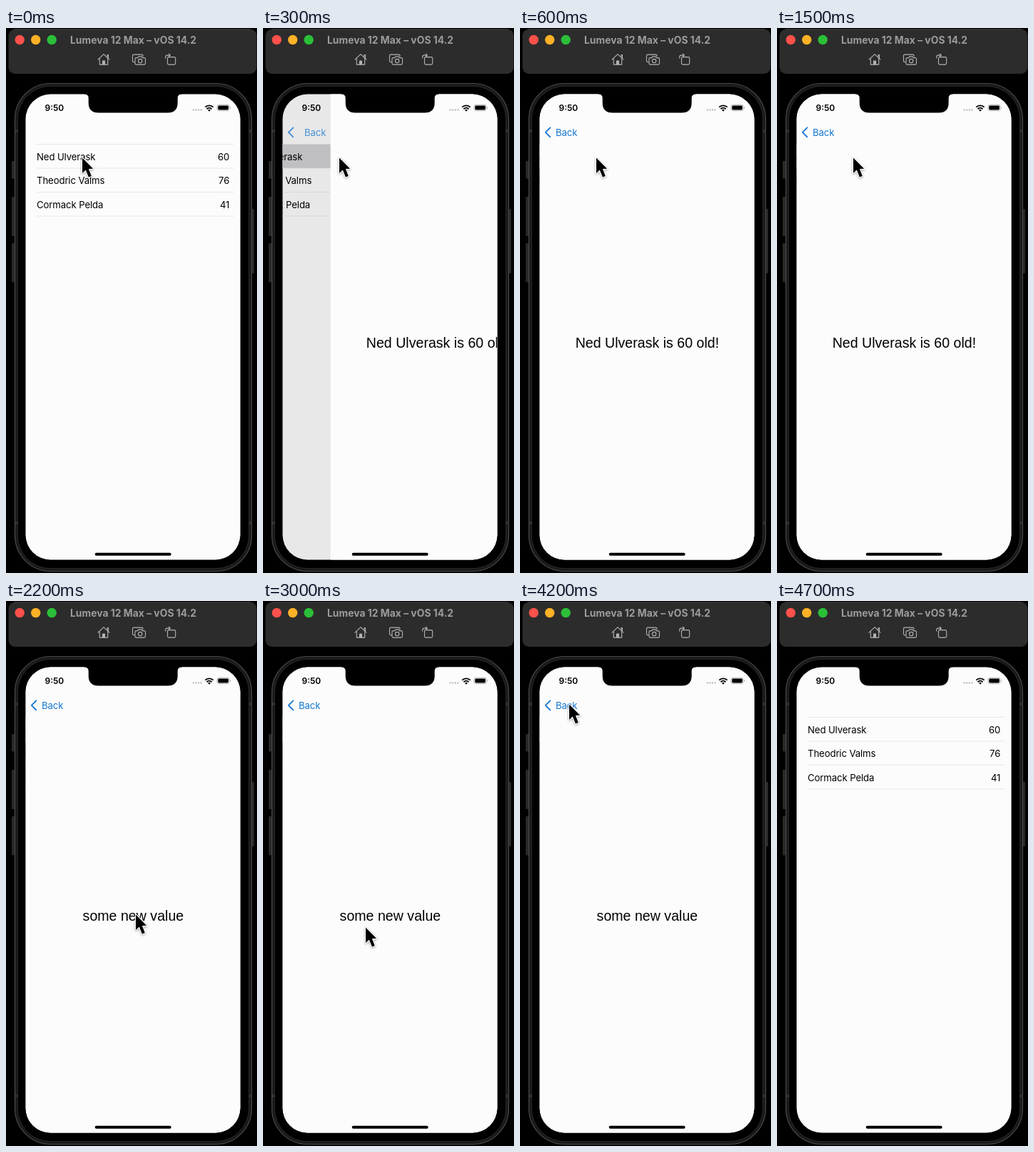
These frames come from a looping animation (352 by 762 pixels, 4.8 s). An HTML page:

```html
<!DOCTYPE html>
<html lang="en">
<head>
<meta charset="utf-8">
<title>List and detail</title>
<style>
  html, body { margin: 0; width: 100%; height: 100%; overflow: hidden; background: #000; }
  svg { display: block; width: 100%; height: 100%; }
  text { font-family: Inter, Roboto, sans-serif; white-space: pre; }
  .row { font-size: 13.2px; letter-spacing: -.12px; }
  .detail { font: 19.6px "Liberation Sans", Arial, sans-serif; text-anchor: middle; }
  .icon { fill: none; stroke: #b3b3b3; stroke-width: 1.1; stroke-linejoin: round; stroke-linecap: round; }
  #cursor { filter: drop-shadow(0 1.5px 1.5px rgba(0, 0, 0, .35)); }
</style>
</head>
<body>
<svg viewBox="0 0 352 762">
  <defs>
    <clipPath id="screen"><rect x="27.5" y="92.5" width="301" height="651" rx="35"/></clipPath>
  </defs>
  <rect width="352" height="762"/>

  <!-- simulator title bar -->
  <rect x="3.5" y="1.5" width="348" height="62.5" rx="9" fill="#2c2c2c"/>
  <path d="M12 1.9H343" stroke="#4c4c4c" stroke-width=".8"/>
  <circle cx="19.2" cy="16.5" r="6.7" fill="#fe514b"/>
  <circle cx="41.7" cy="16.5" r="6.7" fill="#fdb126"/>
  <circle cx="64.2" cy="16.5" r="6.7" fill="#2bc038"/>
  <text x="90" y="21.5" font-size="13.9" font-weight="700" fill="#9c9c9c">Lumeva 12 Max – vOS 14.2</text>
  <g class="icon" transform="translate(0 -.4)">
    <path d="M129 44.5L137 37l8 7.5M131.3 43v8.500h11.400V43M142 41.500V38h1.500v5"/>
    <path d="M135.500 51.500v-5h3v5" fill="#b3b3b3"/>
    <path d="M180 48h-1a1.500 1.500 0 0 1-1.500-1.500V39A1.500 1.500 0 0 1 179 37.500h11.500A1.500 1.500 0 0 1 192 39v1"/>
    <path d="M182.500 42h2.200l1.200-1.700h4.200l1.200 1.700h2.700a1.500 1.500 0 0 1 1.500 1.500v6.500a1.500 1.500 0 0 1-1.500 1.500h-11.500a1.500 1.500 0 0 1-1.500-1.500v-6.500a1.500 1.500 0 0 1 1.500-1.500z"/>
    <circle cx="188.200" cy="46.500" r="2.700"/>
    <rect x="226.500" y="41" width="11.200" height="10.500" rx="1.800"/>
    <path d="M223.700 42.500v-1.500a2.500 2.500 0 0 1 2.500-2.500h4M228.300 36.500l2.200 2-2.200 2"/>
  </g>

  <!-- phone body -->
  <g fill="#292929">
    <rect x="8" y="186" width="6" height="24.500" rx="1"/>
    <rect x="8" y="236" width="6" height="55" rx="1"/>
    <rect x="8" y="301" width="6" height="54.500" rx="1"/>
    <rect x="343" y="253" width="5" height="90" rx="1"/>
  </g>
  <rect x="12.500" y="77.500" width="332" height="682" rx="50" fill="#191919" stroke="#4a4a4a" stroke-width="1.200"/>
  <rect x="16.300" y="81.300" width="324.400" height="674.400" rx="46" stroke="#2b2b2b"/>
  <path d="M13 144h4M340.500 144h4M13 692h4M340.500 692h4" stroke="#333" stroke-width="3.500"/>

  <!-- screen -->
  <g clip-path="url(#screen)">
    <rect x="27" y="92" width="302" height="652" fill="#fcfcfc"/>
    <g id="list">
      <rect id="pressed" x="27.500" y="162.500" width="301" height="33.500" fill="#d0d0d4"/>
    </g>
    <rect id="dim" x="27" y="92" width="302" height="652"/>
    <g id="page">
      <rect x="27.500" y="92" width="302" height="652" fill="#fcfcfc"/>
      <text id="detail" class="detail" x="178.400" y="447"></text>
    </g>
    <g id="back" fill="#1677d2">
      <path d="M42.300 139.300l-6.500 6.500 6.500 6.500" fill="none" stroke="#1677d2" stroke-width="1.900" stroke-linecap="round" stroke-linejoin="round"/>
      <text id="label" class="row" y="150.500">Back</text>
    </g>
  </g>

  <!-- status bar, notch, home indicator -->
  <path d="M110 91.500H246.500V92.500Q240.700 92.500 240.700 98V104.500Q240.700 118.500 226.700 118.500H129.700Q115.700 118.500 115.700 104.500V98Q115.700 92.500 110 92.500Z"/>
  <text x="54.500" y="116" font-size="12" font-weight="600">9:50</text>
  <path d="M262.700 114.500h11" stroke="#bcbcbc" stroke-width="2.400" stroke-linecap="round" stroke-dasharray="0 3.600"/>
  <g fill="none" stroke="#000" stroke-width="1.900">
    <path d="M279.300 110.700a8.100 8.100 0 0 1 11.400 0M281.500 113.200a5 5 0 0 1 7 0"/>
  </g>
  <path d="M285 116.800l-1.900-2a2.700 2.700 0 0 1 3.800 0z"/>
  <rect x="296" y="107.300" width="17.300" height="8.400" rx="2.500" fill="none" stroke="#a8a8a8" stroke-width=".8"/>
  <rect x="297.300" y="108.600" width="14.700" height="5.800" rx="1.400"/>
  <path d="M314.300 110.100v2.800q1-.4 1-1.400t-1-1.400z" fill="#a8a8a8"/>
  <rect x="124.700" y="733.800" width="107" height="4" rx="2"/>

  <g id="cursor">
    <path d="M0 1.500V23L4.800 18.600L8.900 28.500L12.800 26.900L8.900 17.100L15.200 16.800Z"
          stroke="#fff" stroke-width="2.200" stroke-linejoin="round" paint-order="stroke"/>
  </g>
</svg>
<script>
const LOOP = 4800, STEP = 100, WIDTH = 301, PARALLAX = 0.3;
const $ = id => document.getElementById(id);

const people = [["Ned Ulverask", 60], ["Theodric Valms", 76], ["Cormack Pelda", 41]];

// time, x, y of the pointer tip
const path = [
  [0, 107, 180], [1900, 107, 180], [2000, 140, 290], [2100, 181, 432], [2200, 182, 437],
  [2300, 182, 438], [2500, 190, 463], [2700, 165, 461], [3000, 144, 455], [3100, 183, 460],
  [3200, 220, 460], [3500, 220, 460], [3600, 207, 425], [3800, 115, 235], [4000, 71, 148],
  [4100, 69, 143], [LOOP, 69, 143]
];

function add(parent, tag, attrs, content = "") {
  const el = document.createElementNS("http://www.w3.org/2000/svg", tag);
  for (const key in attrs) el.setAttribute(key, attrs[key]);
  el.textContent = content;
  parent.appendChild(el);
}

function buildList() {
  const list = $("list");
  for (let i = 0; i <= people.length; i++) {
    const y = 162.5 + i * 33.5;
    add(list, "path", { d: `M43 ${y}H320`, stroke: "#e6e6e7", "stroke-width": 0.9 });
  }
  people.forEach(([name, age], i) => {
    const y = 184.5 + i * 33.5;
    add(list, "text", { class: "row", x: 43, y }, name);
    add(list, "text", { class: "row", x: 313.3, y, "text-anchor": "end" }, age);
  });
}

// exponential settle from 0 to 1
function settle(t, start, rate) {
  if (t <= start) return 0;
  const p = 1 - Math.exp(-rate * (t - start) / 1000);
  return p > 0.987 ? 1 : p;
}

function pointer(t) {
  const i = path.findIndex(k => k[0] > t);
  const [t0, x0, y0] = path[i - 1], [t1, x1, y1] = path[i];
  const f = (t - t0) / (t1 - t0);
  return [x0 + (x1 - x0) * f, y0 + (y1 - y0) * f];
}

function render(ms) {
  const t = Math.floor(ms / STEP) * STEP;
  const shown = settle(t, 150, 10) - settle(t, 4300, 15);
  const away = WIDTH * (1 - shown);
  const move = (id, x, y = 0) => $(id).setAttribute("transform", `translate(${x} ${y})`);

  move("list", -PARALLAX * WIDTH * shown);
  move("page", away);
  $("dim").setAttribute("opacity", 0.1 * shown);
  $("pressed").setAttribute("opacity", t < 100 ? 0 : t < 4300 ? 1 : shown);
  $("back").setAttribute("opacity", shown);
  $("label").setAttribute("x", 50 + 0.12 * away);
  $("detail").textContent = t < 2200 ? `${people[0][0]} is ${people[0][1]} old!` : "some new value";

  move("cursor", ...pointer(t));
  $("cursor").setAttribute("visibility", t < 4700 ? "visible" : "hidden");
}

buildList();
const begin = performance.now();
function tick() {
  render((performance.now() - begin) % LOOP);
  requestAnimationFrame(tick);
}
tick();
</script>
</body>
</html>
```
